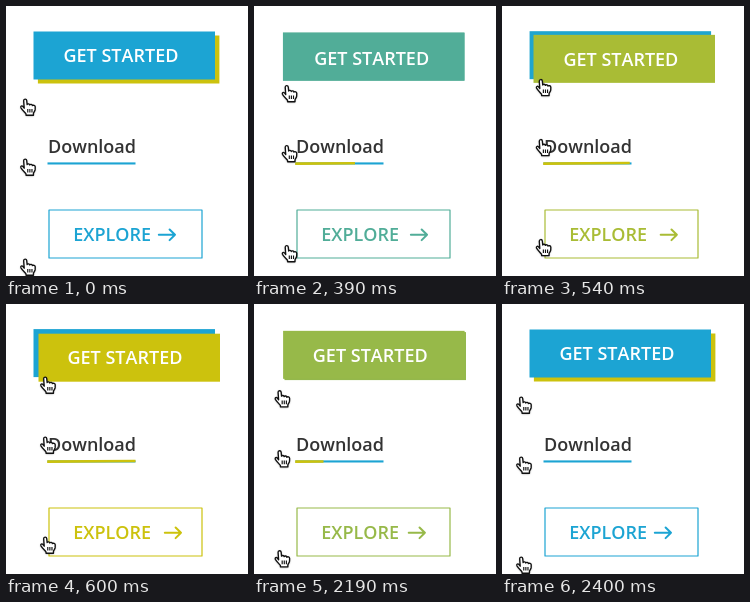
An HTML page with a canvas for the animation above (3600 ms loop, 242 px wide and 270 px high).

```html
<!DOCTYPE html>
<html lang="en">
<head>
<meta charset="utf-8">
<title>Button hover states</title>
<style>
  html, body { margin: 0; width: 100%; height: 100%; overflow: hidden; background: #fff; }
  canvas { display: block; width: 242px; height: 270px; }
</style>
</head>
<body>
<canvas id="stage"></canvas>
<script>
const W = 242, H = 270, LOOP = 3600, STEP = 30;
const BLUE = [28, 164, 211], YELLOW = [204, 194, 13];
const FONT = '600 18px "Open Sans", sans-serif';

const canvas = document.getElementById('stage');
const ctx = canvas.getContext('2d');
const dpr = window.devicePixelRatio || 1;
canvas.width = W * dpr;
canvas.height = H * dpr;

const clamp = v => Math.min(1, Math.max(0, v));
const lerp = (a, b, k) => a + (b - a) * k;
const mix = k => `rgb(${BLUE.map((c, i) => Math.round(lerp(c, YELLOW[i], k))).join(',')})`;

// cubic-bezier(0, 0, .14, 1)
function easeOut(p) {
  const curve = (s, c) => 3 * c * s * s * (1 - s) + s ** 3;
  let lo = 0, hi = 1;
  for (let i = 0; i < 24; i++) {
    const mid = (lo + hi) / 2;
    if (curve(mid, 0.14) < p) lo = mid; else hi = mid;
  }
  return p <= 0 ? 0 : p >= 1 ? 1 : curve(lo, 1);
}

const hand = new Path2D(
  'M4 9.2 L3.5 2.2 C3.4 .2 6.2 .1 6.4 2 L6.8 5.8 C7.2 4.8 9.1 4.9 9.3 6.2 ' +
  'C9.9 5.2 11.6 5.5 11.8 6.8 C12.6 6 14.4 6.5 14.5 8 L14.4 10.6 ' +
  'C14.2 12.3 12.9 13 12.8 14.3 L12.8 16 L5.8 16 L5.7 14.6 ' +
  'C4.3 13 2.2 10.8 .9 8.9 C.2 7.3 1.8 6.5 2.8 7.6 Z');
const creases = new Path2D('M7.4 10 V13.4 M9.4 10 V13.4 M11.4 10 V13.4');

// Colours and the forward slide run linearly; everything else eases out.
function stateAt(ms) {
  const t = Math.floor((ms % LOOP) / STEP) * STEP;
  if (t < 2100) {
    const p = clamp((t - 300) / 300);
    return { tint: p, face: p, move: easeOut(p) };
  }
  const p = clamp((t - 2099) / 301);
  const move = 1 - easeOut(p);
  return { tint: 1 - p, face: move, move };
}

function rect(color, x, y, w, h) {
  ctx.fillStyle = color;
  ctx.fillRect(x, y, w, h);
}

function label(text, color, x, y) {
  ctx.fillStyle = color;
  ctx.fillText(text, x, y);
}

function drawSolid({ tint, face, move }) {
  const back = 4.4 * (1 - move);
  rect(mix(1 - move), 27.5 + back, 25.1 + back, 181.5, 48);
  rect(mix(tint), 27.5 + 5 * face, 25.5 + 4.2 * face, 181.5, 48);
  label('GET STARTED', '#fff', 57.5 + 4 * move, 56.3 + 4 * move);
}

function drawLink({ move }) {
  label('Download', '#333', 42, 147);
  rect(mix(0), 41.5, 156.4, 88, 2.1);
  // The highlight rises slightly towards its right end.
  ctx.strokeStyle = mix(1);
  ctx.lineWidth = 2.7;
  ctx.lineCap = 'butt';
  ctx.beginPath();
  ctx.moveTo(41.2, 157.7);
  ctx.lineTo(41.2 + 88.3 * move, 157.7 - 0.7 * move);
  ctx.stroke();
}

function drawOutline({ tint, move }) {
  const color = mix(tint);
  ctx.strokeStyle = color;
  ctx.lineWidth = 1.2;
  ctx.strokeRect(43, 204, 153, 48);
  label('EXPLORE', color, 67.3, 235);

  const x = 152.8 + 6 * move, y = 228.8;
  ctx.lineWidth = 2;
  ctx.lineCap = ctx.lineJoin = 'round';
  ctx.beginPath();
  ctx.moveTo(x, y);
  ctx.lineTo(x + 16.2, y);
  ctx.moveTo(x + 10.8, y - 5.3);
  ctx.lineTo(x + 16.2, y);
  ctx.lineTo(x + 10.8, y + 5.3);
  ctx.stroke();
}

function drawHand(x, y) {
  ctx.save();
  ctx.translate(x, y);
  ctx.scale(1.05, 1.05);
  ctx.lineJoin = 'round';
  ctx.lineCap = 'butt';
  ctx.save();
  ctx.shadowColor = 'rgba(0,0,0,.5)';
  ctx.shadowBlur = 2 * dpr;
  ctx.shadowOffsetY = 0.6 * dpr;
  ctx.fillStyle = '#fff';
  ctx.fill(hand);
  ctx.restore();
  ctx.strokeStyle = '#111';
  ctx.lineWidth = 1.3;
  ctx.stroke(hand);
  ctx.lineWidth = 1.1;
  ctx.stroke(creases);
  ctx.restore();
}

function draw(ms) {
  const s = stateAt(ms);
  ctx.setTransform(dpr, 0, 0, dpr, 0, 0);
  rect('#fff', 0, 0, W, H);
  ctx.font = FONT;
  ctx.fontKerning = 'none';
  ctx.textBaseline = 'alphabetic';
  drawSolid(s);
  drawLink(s);
  drawOutline(s);
  const d = 20 * s.move;
  for (const y of [92.5, 152.5, 252.5]) drawHand(14 + d, y - d);
}

const start = performance.now();
function tick() {
  draw(performance.now() - start);
  requestAnimationFrame(tick);
}
tick();
</script>
</body>
</html>
```
